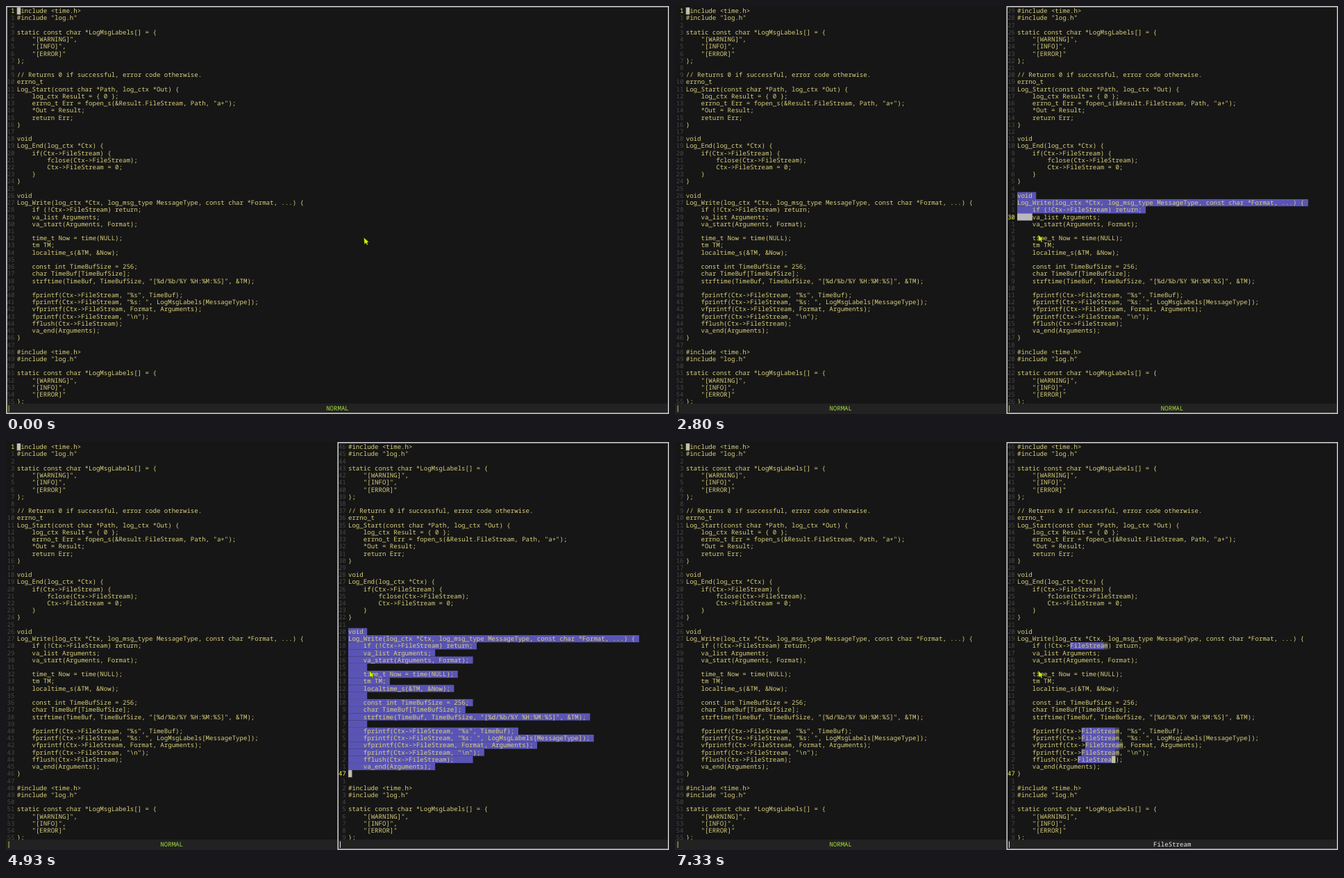
An HTML page for the animation above (8 s loop, 955 by 587 pixels).

```html
<!DOCTYPE html>
<html lang="en">
<head>
<meta charset="utf-8">
<title>Editor: select in matches</title>
<style>
  html, body { margin: 0; width: 100%; height: 100%; overflow: hidden; background: #161616; }
  svg { display: block; width: 955px; height: 587px; }
  text { font: 9.07px "Noto Sans Mono", "DejaVu Sans Mono", monospace; fill: #d9cf7d; text-rendering: geometricPrecision; }
  .num { fill: #484848; text-anchor: end; }
  .num.now { fill: #f0f04c; }
  .mode { text-anchor: middle; }
</style>
</head>
<body>
<svg id="stage" viewBox="0 0 955 587"></svg>
<script>
const LOOP = 8000, ROWS = 56, CW = 5.442, RH = 10.22, TOP = 2, LEFT = 15.7, SPLIT = 477.3;
const GREEN = '#a2d93f', WHITE = '#e6e6e6', BLOCK = '#b9b9b9', SELECT = '#5a55b4', DIM = '#484848';

const file = `#include <time.h>
#include "log.h"

static const char *LogMsgLabels[] = {
    "[WARNING]",
    "[INFO]",
    "[ERROR]"
};

// Returns 0 if successful, error code otherwise.
errno_t
Log_Start(const char *Path, log_ctx *Out) {
    log_ctx Result = { 0 };
    errno_t Err = fopen_s(&Result.FileStream, Path, "a+");
    *Out = Result;
    return Err;
}

void
Log_End(log_ctx *Ctx) {
    if(Ctx->FileStream) {
        fclose(Ctx->FileStream);
        Ctx->FileStream = 0;
    }
}

void
Log_Write(log_ctx *Ctx, log_msg_type MessageType, const char *Format, ...) {
    if (!Ctx->FileStream) return;
    va_list Arguments;
    va_start(Arguments, Format);
\t
    time_t Now = time(NULL);
    tm TM;
    localtime_s(&TM, &Now);
\t
    const int TimeBufSize = 256;
    char TimeBuf[TimeBufSize];
    strftime(TimeBuf, TimeBufSize, "[%d/%b/%Y %H:%M:%S]", &TM);
\t
    fprintf(Ctx->FileStream, "%s", TimeBuf);
    fprintf(Ctx->FileStream, "%s: ", LogMsgLabels[MessageType]);
    vfprintf(Ctx->FileStream, Format, Arguments);
    fprintf(Ctx->FileStream, "\\n");
    fflush(Ctx->FileStream);\t
    va_end(Arguments);
}
`.replace(/\t/g, '    ').split('\n');
const lines = Array.from({ length: ROWS }, (_, r) => file[r % file.length]);

// Timelines: [start, value]
const cursorRow = [[0, 28], [1600, 27], [2000, 26], [2270, 27]];
for (let i = 0; i < 8; i++) cursorRow.push([Math.round((280 + i * 20 / 3)) * 10, 29 + 2 * i]);
cursorRow.push([3400, 44], [3600, 45], [3730, 46]);
const typed = [5600, 6000, 6200, 6270, 6670, 6930, 7130, 7200, 7270, 7330];
const mouseAt = [[0, [515.3, 333]], [130, [515.3, 332]], [730, [519, 330.5]], [800, [523, 329]]];
const SPLIT_AT = 470, FOCUS_AT = 530, MARK_AT = 2270, PROMPT_AT = 4930;
const WORD = 'FileStream', MARK_ROW = 26, LAST_ROW = 46;

const at = (table, t) => table.reduce((v, [start, next]) => t >= start ? next : v, table[0][1]);

function el(parent, tag, attrs = {}, content = '') {
  const node = document.createElementNS('http://www.w3.org/2000/svg', tag);
  set(node, attrs);
  node.textContent = content;
  return parent.appendChild(node);
}
function set(node, attrs) {
  for (const k in attrs) node.setAttribute(k, attrs[k]);
}
const baseline = r => TOP + r * RH + 8.2;

function makePane(x) {
  const root = el(stage, 'g', { transform: `translate(${x} 0)` });
  const back = el(root, 'rect', { height: 587, fill: '#161616' });
  const marks = el(root, 'g');
  const nums = lines.map((line, r) => {
    const indent = line.search(/\S/);
    if (indent >= 0) el(root, 'text', { x: LEFT + indent * CW, y: baseline(r) }, line.trim());
    return el(root, 'text', { class: 'num', x: 12.5, y: baseline(r) });
  });
  const bar = el(root, 'rect', { y: 572, height: 15, fill: '#222' });
  const caret = el(root, 'rect', { x: 3.6, y: 574.5, width: 1, height: 9.5 });
  const mode = el(root, 'text', { class: 'mode', y: 582.2 });
  const frame = el(root, 'rect', { x: 0.9, y: 0.9, height: 585.2, fill: 'none', stroke: '#d6d6d6', 'stroke-width': 1.5 });

  const mark = (row, col, n, fill) => el(marks, 'rect', {
    x: LEFT + col * CW, y: TOP + row * RH, width: n * CW, height: RH, fill
  });

  function draw({ width, focus, row, selecting, prompt, query }) {
    set(back, { width });
    set(bar, { width });
    set(frame, { width: width - 1.6, visibility: focus ? 'visible' : 'hidden' });
    set(caret, { fill: prompt ? WHITE : GREEN });
    set(mode, { x: width / 2, style: `fill:${prompt ? WHITE : GREEN}` });
    mode.textContent = prompt ? query : 'NORMAL';
    nums.forEach((n, r) => {
      n.textContent = r === row ? row + 1 : Math.abs(r - row);
      n.classList.toggle('now', r === row);
    });

    marks.replaceChildren();
    if (query) {
      const hits = [];
      for (let r = MARK_ROW; r <= LAST_ROW; r++)
        for (let c = lines[r].indexOf(query); c >= 0; c = lines[r].indexOf(query, c + 1)) hits.push([r, c]);
      hits.forEach(([r, c], i) => {
        const n = query.length - 1;
        if (n) mark(r, c, n, SELECT);
        mark(r, c + n, 1, i === hits.length - 1 ? BLOCK : DIM);
      });
    } else {
      if (selecting)
        for (let r = MARK_ROW; r < row; r++) mark(r, 0, lines[r].length + 1, SELECT);
      mark(row, 0, lines[row].startsWith('    ') ? 4 : 1, BLOCK);
    }
  }
  return { root, draw };
}

const stage = document.getElementById('stage');
const left = makePane(0), right = makePane(SPLIT);
const mouse = el(stage, 'path', {
  d: 'M0 0L.9 10L3 8L4.6 11L6.2 10.2L4.9 7.3L7.6 6.8Z',
  fill: '#c4f500', stroke: '#111', 'stroke-width': 0.5
});

let shown = '';
function render(t) {
  const split = t >= SPLIT_AT, focus = t >= FOCUS_AT;
  const state = {
    width: 955 - SPLIT, focus,
    row: at(cursorRow, t),
    selecting: t >= MARK_AT,
    prompt: t >= PROMPT_AT,
    query: WORD.slice(0, typed.filter(s => t >= s).length)
  };
  const [mx, my] = at(mouseAt, t);
  const key = JSON.stringify([state, split, mx, my]);
  if (key === shown) return;
  shown = key;
  left.draw({ width: split ? SPLIT : 955, focus: !focus, row: 0 });
  set(right.root, { visibility: split ? 'visible' : 'hidden' });
  right.draw(state);
  if (!split || !focus) right.root.lastChild.setAttribute('visibility', 'hidden');
  set(mouse, { transform: `translate(${mx} ${my})` });
}

const start = performance.now();
function tick() {
  render((performance.now() - start) % LOOP);
  requestAnimationFrame(tick);
}
tick();
</script>
</body>
</html>
```
